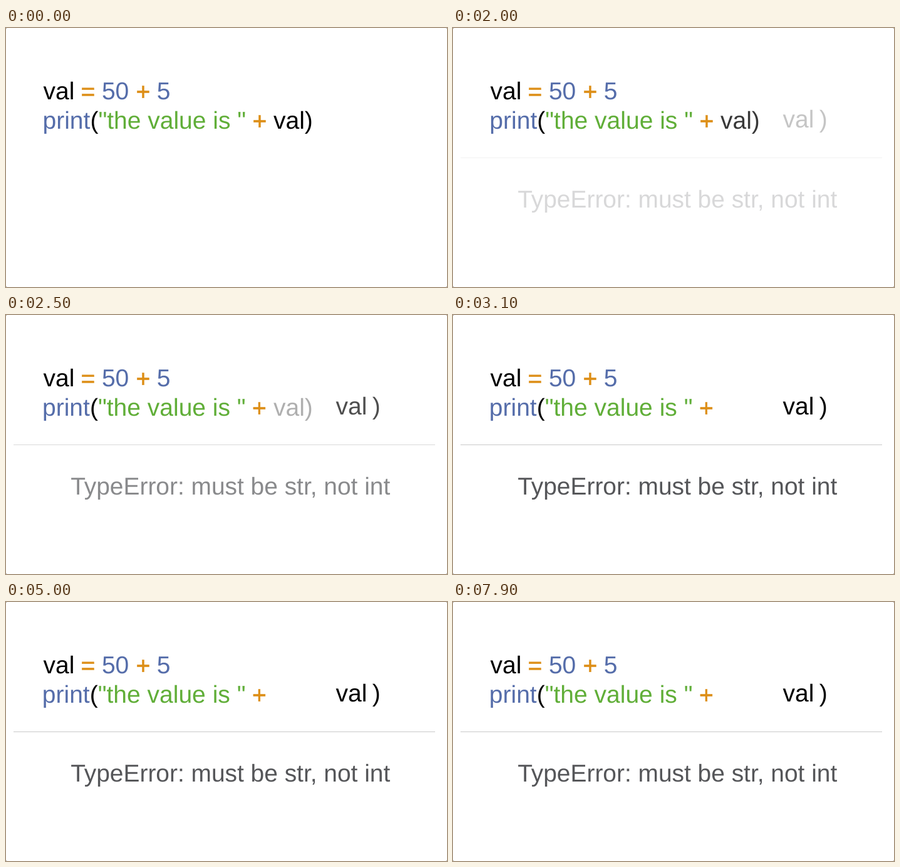
An HTML page that plays this animation: 704x414 px, repeating every 8 s.

```html
<!DOCTYPE html>
<html lang="en">
<head>
<meta charset="utf-8">
<title>TypeError dissolve</title>
<style>
  html, body { margin: 0; width: 100%; height: 100%; overflow: hidden; background: #888; }
  svg { display: block; }
  text { font: 39px "Liberation Sans", Helvetica, Arial, sans-serif; text-rendering: geometricPrecision; white-space: pre; }
  .op { fill: #dd8f18; stroke: #dd8f18; stroke-width: .6px; }
  .name { fill: #556daa; }
  .str { fill: #60ae38; }
  .error { fill: #555659; font-size: 38.9px; }
</style>
</head>
<body>
<svg width="704" height="414" viewBox="0 0 704 414">
  <rect width="704" height="414" rx="2" fill="#fff"/>
  <g>
    <text x="59.6" y="114">val</text>
    <text x="119.6" y="115.3" class="op">=</text>
    <text x="152.9" y="114" class="name">50</text>
    <text x="207.4" y="115.3" class="op">+</text>
    <text x="240.8" y="114" class="name">5</text>
  </g>
  <g id="call">
    <text x="58.5" y="161"><tspan class="name">print</tspan>(<tspan class="str">"the value is "</tspan></text>
    <text x="393.6" y="162.3" class="op">+</text>
  </g>
  <text id="before" x="427" y="161">val)</text>
  <g id="after">
    <text x="526.6" y="159">val</text>
    <text x="584.8" y="159">)</text>
    <path d="M12 207.5H685" stroke="#c9c9c9"/>
    <text x="103.2" y="287" class="error">TypeError: must be str, not int</text>
  </g>
</svg>
<script>
  const LOOP = 8000, STEP = 100, FADE_START = 1500, FADE_TIME = 1600;
  const [call, before, after] = ["call", "before", "after"].map(id => document.getElementById(id));
  const easeInOut = u => (1 - Math.cos(Math.PI * u)) / 2;

  function draw(now) {
    const time = Math.floor(now % LOOP / STEP) * STEP;
    const shown = easeInOut(Math.min(1, Math.max(0, (time - FADE_START) / FADE_TIME)));
    after.setAttribute("opacity", shown);
    before.setAttribute("opacity", 1 - shown);
    call.setAttribute("transform", `translate(${-0.7 * shown} 0)`);
  }

  let start;
  function tick(now) {
    start ??= now;
    draw(now - start);
    requestAnimationFrame(tick);
  }
  draw(0);
  requestAnimationFrame(tick);
</script>
</body>
</html>
```
